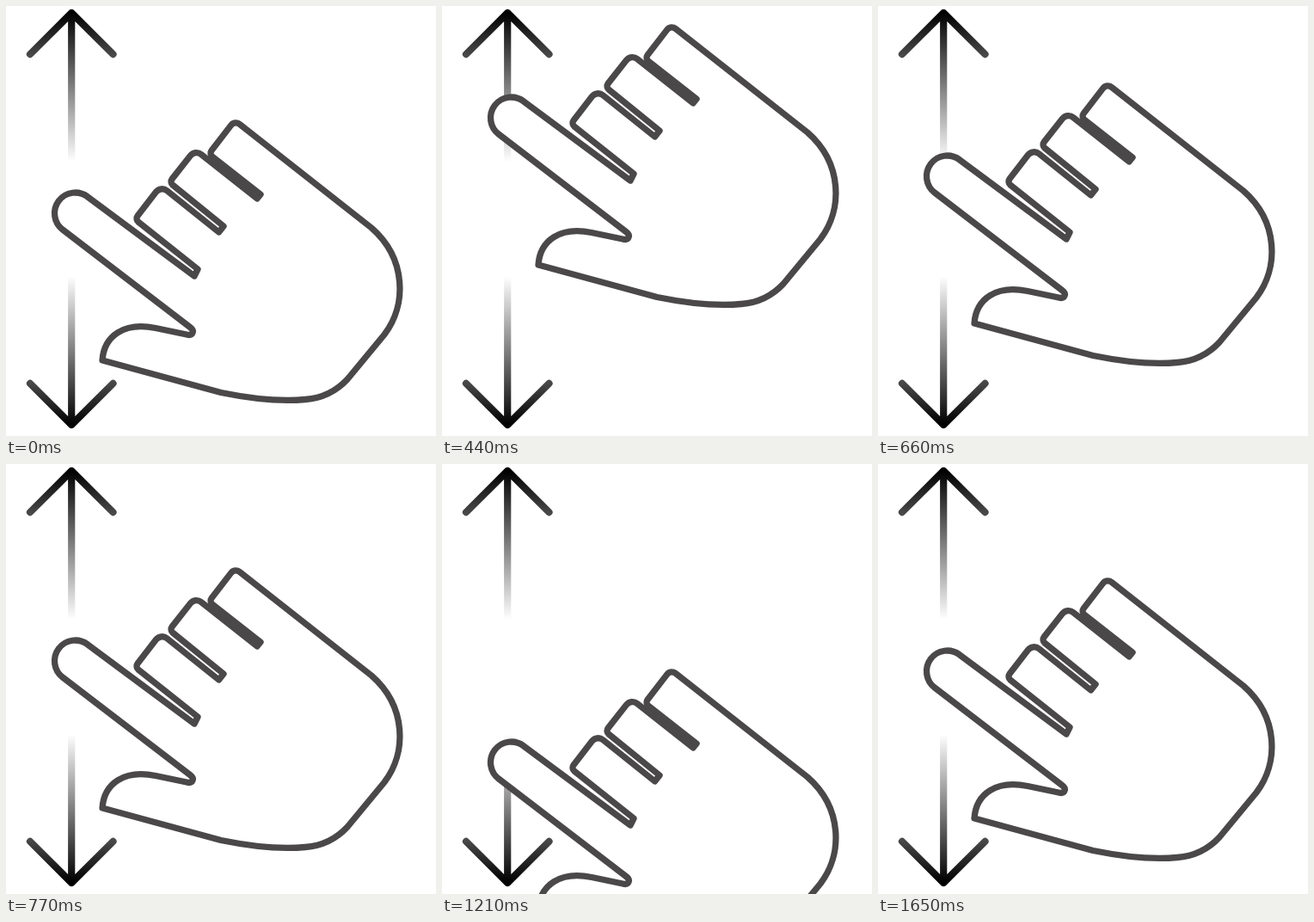
An HTML page with a canvas for the animation above (1.87 s loop, 500 px wide and 500 px high).

```html
<!DOCTYPE html>
<html lang="en">
<head>
<meta charset="utf-8">
<title>Swipe up and down</title>
<style>
  html, body { margin: 0; width: 100%; height: 100%; overflow: hidden; background: #fff; }
  canvas { display: block; width: 500px; height: 500px; }
</style>
</head>
<body>
<canvas id="stage" width="500" height="500"></canvas>
<script>
const ctx = document.getElementById("stage").getContext("2d");
const STEP = 110;
// Vertical hand offset for each step of the swipe: up, down, back to rest.
const offsets = [0, -50, -104, -138, -111, -75, -43, -12, 2, 18, 60, 106, 138, 100, 48, 0, 0];

function buildHand() {
  const hand = new Path2D();
  const corner = (x, y, nextX, nextY, r) => hand.arcTo(x, y, nextX, nextY, r);

  // Thumb and palm
  hand.moveTo(112, 412);
  hand.lineTo(250, 449.5);
  hand.bezierCurveTo(282, 456, 318, 460.5, 348, 457.5);
  hand.bezierCurveTo(368, 456, 384, 448, 397, 434);
  hand.lineTo(440, 382);
  hand.bezierCurveTo(466, 348, 466, 294, 425, 258);

  // Little finger
  corner(266, 133, 236, 172, 7);
  corner(236, 172, 296, 219, 5);
  hand.lineTo(296, 219);
  hand.lineTo(292, 224);

  // Ring finger
  corner(220, 167, 190, 205, 9);
  corner(190, 205, 253, 256, 5);
  hand.lineTo(253, 256);
  hand.lineTo(247.5, 263);

  // Middle finger
  corner(180, 209, 150, 248, 9);
  corner(150, 248, 223, 306, 5);
  hand.lineTo(223, 306);
  hand.lineTo(219, 314);

  // Index finger
  hand.lineTo(95, 222);
  hand.arc(80.5, 241, 24, -0.93, 2.21, true);
  hand.lineTo(214, 373.5);
  hand.bezierCurveTo(220, 378, 217, 384, 210, 382);
  hand.lineTo(174, 374.5);
  hand.bezierCurveTo(138, 367, 114, 383, 112, 412);
  hand.closePath();
  return hand;
}

const hand = buildHand();

function drawArrow() {
  const fade = ctx.createLinearGradient(0, 8, 0, 181);
  fade.addColorStop(0, "#000");
  fade.addColorStop(1, "rgba(0,0,0,0)");
  ctx.strokeStyle = fade;
  ctx.lineWidth = 8.2;
  ctx.lineCap = ctx.lineJoin = "round";
  ctx.beginPath();
  ctx.moveTo(28, 56.2);
  ctx.lineTo(76.2, 8);
  ctx.lineTo(124.5, 56.2);
  ctx.moveTo(76.2, 8);
  ctx.lineTo(76.2, 181);
  ctx.stroke();
}

function drawHand(y) {
  ctx.save();
  ctx.translate(0, y);
  ctx.fillStyle = "#fff";
  ctx.strokeStyle = "#4a4849";
  ctx.lineWidth = 7.3;
  ctx.lineJoin = "round";
  ctx.fill(hand);
  ctx.stroke(hand);
  ctx.restore();
}

function draw(time) {
  const step = Math.floor(time / STEP) % offsets.length;
  ctx.fillStyle = "#fff";
  ctx.fillRect(0, 0, 500, 500);
  drawArrow();
  ctx.save();
  ctx.translate(0, 495);
  ctx.scale(1, -1);
  drawArrow();
  ctx.restore();
  drawHand(offsets[step]);
}

const start = performance.now();
function tick() {
  draw(performance.now() - start);
  requestAnimationFrame(tick);
}
tick();
</script>
</body>
</html>
```
